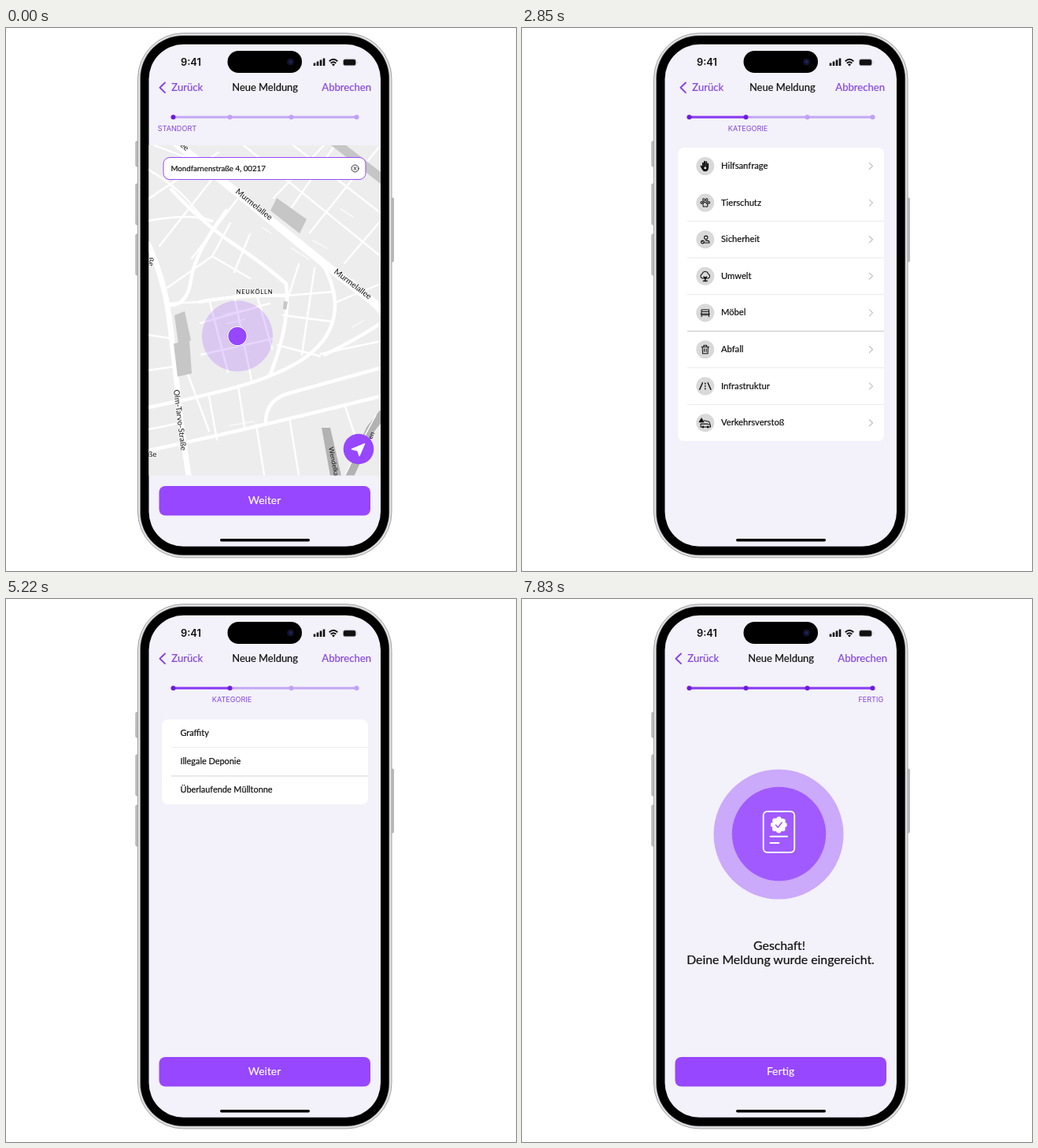
An HTML page that plays this animation: 648x690 px, repeating every 8 s.

```html
<!DOCTYPE html>
<html lang="de">
<head>
<meta charset="utf-8">
<style>
html, body { margin: 0; width: 100%; height: 100%; overflow: hidden; background: #fff; }
svg { display: block; width: 648px; height: 690px; }
text { font-family: Lato, "Open Sans", sans-serif; fill: #111; }
.medium { stroke: currentColor; stroke-width: .18; }
.inter { font-family: Inter, sans-serif; }
.street { font: 10px Roboto, sans-serif; fill: #444; stroke: #fff; stroke-width: 1.5; paint-order: stroke; }
.mid { text-anchor: middle; }
.line { fill: none; stroke-linecap: round; stroke-linejoin: round; }
.purple { fill: #8444e0; color: #8444e0; }
.white { fill: #fff; color: #fff; }
.solid { fill: #111; }
.page { display: none; }
.page.on { display: inline; }
</style>
</head>
<body>
<svg viewBox="0 0 648 690">
  <defs>
    <clipPath id="mapArea"><rect x="181.500" y="149" width="294.500" height="419.500"/></clipPath>
  </defs>

  <!-- phone body -->
  <g fill="#bdbdc0" stroke="#98989b" stroke-width=".6">
    <rect x="164.800" y="144" width="4" height="32" rx="1.200"/>
    <rect x="164.800" y="198" width="4" height="52" rx="1.200"/>
    <rect x="164.800" y="262" width="4" height="52" rx="1.200"/>
    <rect x="488.500" y="216" width="4" height="81" rx="1.200"/>
  </g>
  <rect x="167.500" y="6.500" width="322.500" height="666.500" rx="58" fill="#e2e2e4" stroke="#a2a2a5"/>
  <rect x="170.200" y="9.200" width="317" height="661" rx="55" fill="#77777a"/>
  <rect x="171" y="10" width="315.500" height="659.500" rx="54"/>
  <rect x="181.500" y="20.800" width="294.500" height="638" rx="44" fill="#f3f1f9"/>

  <!-- status bar -->
  <rect x="281.500" y="29" width="94.500" height="28" rx="14"/>
  <circle cx="361.500" cy="43" r="4.500" fill="#11122c"/><circle cx="361.500" cy="43" r="2" fill="#20235c"/>
  <text class="inter" x="222" y="47.700" font-size="12.800" font-weight="600">9:41</text>
  <path d="M392 44.500v3.500M396 42.500v5.500M400 40.500v7.500M404 38.500v9.500" stroke="#111" stroke-width="2.600"/>
  <path d="M410.700 42.300q5.300-5 10.600 0M412.700 44.800q3.300-3.100 6.600 0" fill="none" stroke="#111" stroke-width="1.900"/>
  <path d="M416 48.500l-2-2.200q2-1.600 4 0z"/>
  <rect x="428.500" y="39.700" width="16" height="8" rx="2.300" fill="#111" stroke="#aaa" stroke-width=".7"/>
  <path d="M446 42.200q1.500 1.500 0 3z" fill="#aaa"/>

  <!-- location -->
  <g class="page">
    <g clip-path="url(#mapArea)">
      <path fill="#ededed" d="M181 149h296v420h-296z"/>
      <g class="line" stroke="#fff">
        <path stroke-width="2.400" d="M181 217L270 158M195 277L265 188M236 293L302 207M181 245q55-10 82 0M228 164l-40-15M181 180q35 20 55 45t27 20
          M302 149L476 290M340 216L404 149M386 260L442 190L476 149M430 299L476 245M365 149L476 235M320 165L348 190M418 149L360 232
          M262 290l48 28M285 248l-23 42M310 262l-20 48M205 330l57-40M205 350l45-2M247 375l88-25M248 415l90-20M258 345l24 92M290 340l22 108M318 337l20 70
          M356 340l62-5M352 365l62 8M345 403l54 14M372 300l-12 38M392 305l-16 110M476 325l-58 24M476 398l-76 16M440 320l36 44
          M228 432l30 80M258 468l10 55M295 455l8 52M318 504l10 64M360 495l12 73M430 478l20 60M181 390l32 5M181 435l34-5M181 510l40-8"/>
        <path stroke-width="4.500" d="M210 205Q252 250 290 275T356 325Q362 375 335 442M181 482Q300 458 335 442Q420 410 418 349Q415 315 396 292
          M246 348Q300 338 356 340M181 537Q330 505 476 468M330 501Q330 472 360 464T476 432M405 415Q445 396 476 375M280 232Q240 285 235 320T205 352"/>
        <path stroke-width="7" d="M181 275Q201 320 207 365T222 500L232 569"/>
        <path stroke-width="10" d="M200 133L314 226L400 296L478 357"/>
        <path stroke-width="1.500" opacity=".7" d="M363 280l22 14M372 268l25 22M390 270l18 10M277 364l22-5M280 376l24-6M325 253l12 8M425 230l16 10M285 505l30-5M440 380l14-8"/>
      </g>
      <g fill="#c6c6c6">
        <path d="M344 216L382 243L373 261L336 232Z"/>
        <path d="M214 365L227 360L235 397L219 401Z"/>
        <path d="M213 401L233 397L236 439L218 443Z"/>
        <path d="M353 347l5 1-2 10-4-1z"/>
        <path d="M413 149L432 149L476 183V198Z"/>
        <path d="M401 508L412 508L426 569H412Z" fill="#b2b2b2"/>
      </g>
      <path class="line" d="M478 491L463 510L436 570" stroke="#b2b2b2" stroke-width="11"/>
      <path class="line" d="M470 492L452 525L430 570" stroke="#fff" stroke-width="1.500"/>
      <g class="street">
        <text transform="translate(217 147) rotate(39)">llee</text>
        <text transform="translate(291 209) rotate(39)" style="font-size:10.400px">Murmelallee</text>
        <text transform="translate(416 311) rotate(37)" style="font-size:10.400px">Murmelallee</text>
        <text transform="translate(213 460) rotate(83)">Olm-Tarvo-Straße</text>
        <g style="font-size:8.500px;stroke:none">
          <text transform="translate(410 533) rotate(79)">Wendelkai</text>
          <text transform="translate(465 523) rotate(-66)">en</text>
        </g>
        <text x="180.500" y="545">ße</text>
        <text transform="translate(180 292) rotate(83)">ße</text>
        <text class="mid" x="316" y="338" style="font-size:7.500px;letter-spacing:.9px;font-weight:500">NEUKÖLLN</text>
      </g>
    </g>
    <circle cx="294" cy="391.500" r="45" fill="#9747ff" opacity=".22"/>
    <circle cx="294" cy="391.500" r="13.300" fill="#0002"/>
    <circle cx="294" cy="391.500" r="12.200" fill="#9747ff" stroke="#fff" stroke-width="1.200"/>
    <rect x="200" y="164.500" width="257" height="28" rx="8" fill="#fff" stroke="#9747ff"/>
    <text class="medium" x="209.500" y="182" font-size="9.700">Mondfarnenstraße 4, 00217</text>
    <g class="line" stroke="#222" stroke-width=".9"><circle cx="443.500" cy="178.500" r="4.500"/><path d="M442 176.500l3 4m0-4l-3 4"/></g>
    <circle cx="448" cy="535" r="19.300" fill="#9747ff"/>
    <path d="M455.500 528.500L439.500 535.200L447 537L449 543.500Z" fill="#fff" stroke="#fff" stroke-width="1.500" stroke-linejoin="round"/>
  </g>

  <!-- category -->
  <g class="page">
    <rect x="198" y="152" width="262" height="373" rx="8" fill="#fff"/>
    <g id="rows"></g>
  </g>

  <!-- subcategory -->
  <g class="page">
    <rect x="198" y="153" width="262" height="108" rx="8" fill="#fff"/>
    <path d="M210 188.500h250" stroke="#ececf0"/><path d="M210 224.800h250" stroke="#dcdce0" stroke-width="1.300"/>
    <g class="medium" font-size="10.900">
      <text x="221.500" y="174">Graffity</text><text x="221.500" y="210">Illegale Deponie</text><text x="221.500" y="246">Überlaufende Mülltonne</text>
    </g>
  </g>

  <!-- description -->
  <g class="page">
    <rect x="194" y="153.500" width="268.500" height="192.500" rx="20" fill="#fff" stroke="#dddde3"/>
    <text class="inter" x="211" y="177" font-size="9.200" style="fill:#a5a5a8">Beschreibe dein Anliegen....</text>
    <g class="line" stroke="#b9b9be" stroke-width="1.200">
      <rect x="416.500" y="359.500" width="39" height="22" rx="8"/>
      <g stroke="#98989d"><rect x="433.500" y="363" width="5" height="9" rx="2.500"/><path d="M431 369v1q0 4.500 5 4.500t5-4.500v-1M436 374.500v3M432.500 377.500h7"/></g>
    </g>
    <path d="M194 404.500h270" stroke="#cacacf"/>
    <g class="medium" font-size="11"><text x="203.500" y="432">Wenn vorhanden, füge ein Photo zu deinem</text><text x="203.500" y="444">Anliegen hinzu</text></g>
    <g fill="#fff">
      <rect x="201" y="459" width="79" height="75" rx="6"/><rect x="289" y="459" width="79" height="75" rx="6"/><rect x="381" y="459" width="79" height="75" rx="6"/>
    </g>
    <g class="line" stroke="#8444e0" stroke-width="1.500">
      <path d="M232.500 476.500h3l2-2.500h7l2 2.500h3q1.500 0 1.500 1.500v11q0 1.500-1.500 1.500h-17q-1.500 0-1.500-1.500v-11q0-1.500 1.500-1.500z"/>
      <circle cx="241" cy="483" r="4.500"/><path d="M247.500 479.500h.1"/>
      <path d="M321 487h-1.500q-1.500 0-1.500-1.500v-10q0-1.500 1.500-1.500h14q1.500 0 1.500 1.500v2"/>
      <rect x="321.500" y="478" width="17" height="12.500" rx="1.500"/>
      <path d="M322 490l5-5 3 2.500 4-5 4.500 5.500v2.500z" fill="#8444e0"/><circle cx="327" cy="482" r=".6"/>
      <circle cx="420" cy="482.500" r="8.300"/><path d="M417.500 479l5 7m0-7l-5 7"/>
    </g>
    <g class="mid purple medium" font-size="11">
      <text class="purple" x="240.500" y="517.500">Kamera</text><text class="purple" x="328" y="517.500">Gallery</text><text class="purple" x="419.700" y="518">Kein Foto</text>
    </g>
  </g>

  <!-- done -->
  <g class="page">
    <circle cx="326" cy="299" r="82.500" fill="#cba9fb"/><circle cx="326.500" cy="298.500" r="59.700" fill="#a15aff"/>
    <g class="line" stroke="#fff" stroke-width="1.900">
      <rect x="306.700" y="270" width="39.500" height="52" rx="5"/><path d="M315.500 301.800h21.500M315.500 310h11"/>
      <circle cx="326.300" cy="287" r="7.200" fill="#fff" stroke-width="6.400" stroke-dasharray="0 5.655"/>
      <path d="M322.500 287.300l2.700 2.900 5-6.200" stroke="#a15aff" stroke-width="1.600"/>
    </g>
    <g class="mid medium" font-size="15.800"><text x="327" y="445.500">Geschaft!</text><text x="328.500" y="463.500">Deine Meldung wurde eingereicht.</text></g>
  </g>

  <!-- shared header, steps and footer -->
  <path class="line" id="chevron" stroke="#8444e0" stroke-width="1.900"/>
  <g class="medium" font-size="13.100">
    <text class="purple" id="back" y="80">Zurück</text>
    <text class="mid" id="title" y="80" font-size="12.900">Neue Meldung</text>
    <text class="purple" id="cancel" y="80" text-anchor="end">Abbrechen</text>
  </g>
  <g id="steps"></g>
  <text class="inter purple mid" id="label" font-size="9.100"></text>
  <g id="footer">
    <rect x="194.500" y="582" width="268.500" height="37.500" rx="8" fill="#9747ff"/>
    <text class="mid white medium" id="action" x="328.500" y="605.300" font-size="13.800"></text>
  </g>
  <rect x="272" y="649" width="114" height="3.400" rx="1.700"/>
</svg>
<script>
const $ = id => document.getElementById(id);

// icons are drawn around their own centre
const categories = [
  ['Hilfsanfrage', '<path stroke-width="2" d="M-3 1v-5M-.8 0v-6M1.500 0v-5.500M3.600 1v-4M-5.500 0l2 3.500"/><path class="solid" d="M-4 1h8q0 5.500-4 5.500t-4-5.500z"/><circle cy="2.500" r="1" stroke="#fff" fill="#fff"/>'],
  ['Tierschutz', '<path d="M0-.5q2 0 3 3t-1.500 2.800q-1.500-.6-3 0T-3 2.500t3-3z"/><ellipse cx="-2" cy="-3.700" rx="1.300" ry="1.900"/><ellipse cx="2" cy="-3.700" rx="1.300" ry="1.900"/><circle cx="-4.700" cy="-.3" r="1.400"/><circle cx="4.700" cy="-.3" r="1.400"/>'],
  ['Sicherheit', '<circle cx="1" cy="-2.500" r="2.300"/><path d="M-1 4.500h6.500q0-3-3-3h-2"/><circle class="solid" cx="-3.500" cy="3.500" r="2"/><path stroke="#ddd" d="M-4.500 3.500l.8.800 1.200-1.500"/>'],
  ['Umwelt', '<path d="M-3 3q-3.500-.5-3-3.500.2-2 2-2.500 1-3 4-3t4 3q1.800.5 2 2.500.5 3-3 3.500z"/><path stroke-width="1.600" d="M0 6.500v-5M-2 1l2 2 2-2M-2.500 6.500h5"/>'],
  ['Möbel', '<path d="M-5-4h10M-5-1.500h10M-6 1.500h12M-5-4v9M5-4v9M-5 3h10"/>'],
  ['Abfall', '<path d="M-5-3.500h10M-2-3.500v-2h4v2M-3.800-3.500l.4 9h6.800l.4-9M-1.300-1v4M1.300-1v4"/>'],
  ['Infrastruktur', '<path stroke-width="1.500" d="M-3.500-4.500l-4 9M3.500-4.500l4 9M0-4v1M0-.5v1M0 3v1"/>'],
  ['Verkehrsverstoß', '<path class="solid" d="M-5-6l3 5h-6z"/><path d="M-6 1.500h9l4 1.500v2.500h-13zM-1.500-3l6.500 1.500 1.500 3"/><circle class="solid" cx="-3" cy="5.500" r="1"/><circle class="solid" cx="3.500" cy="5.500" r="1"/>']
];

$('rows').innerHTML = categories.map(([name, icon], i) => {
  const y = 175.5 + i * 46.6;
  const divider = i > 1 ? `<path d="M210 ${y - 23.3}h250" stroke="${i == 5 ? '#d6d6db' : '#e9e9ed'}" stroke-width="${i == 5 ? 1.4 : 1}"/>` : '';
  return `${divider}<circle cx="232.800" cy="${y}" r="11.500" fill="#d9d9d9"/>
    <g class="line" transform="translate(232.800 ${y}) scale(.95)" stroke="#111" stroke-width="1.100">${icon}</g>
    <text class="medium" x="253" y="${y + 3.4}" font-size="11.200">${name}</text>
    <path class="line" d="M441.300 ${y - 4}l4.200 4-4.200 4" stroke="#c3c3c8" stroke-width="1.200"/>`;
}).join('');

const stops = [212.5, 284.5, 362.5, 445.5];
const labels = [['STANDORT', 217.5, 130.5], ['KATEGORIE', 287, 130.5], ['BESCHREIBUNG', 365.3, 131.3], ['FERTIG', 443.3, 131.3]];
const pages = [
  { start: 0, step: 0, action: 'Weiter' },
  { start: 2850, step: 1, inset: 6 },
  { start: 4530, step: 1, action: 'Weiter', low: 0.8 },
  { start: 5550, step: 2, action: 'Weiter' },
  { start: 6690, step: 3, action: 'Fertig' }
];
const groups = document.querySelectorAll('.page');
let shown = -1;

function show(index) {
  const { step, action, inset = 0, low = 0 } = pages[index];
  groups.forEach((g, i) => g.classList.toggle('on', i == index));
  $('chevron').setAttribute('d', `M${202 + inset} 69.500l-6.500 6.300 6.500 6.300`);
  $('back').setAttribute('x', 210.3 + inset);
  $('title').setAttribute('x', inset ? 330.8 : 329.2);
  $('cancel').setAttribute('x', 464 - inset / 2);

  $('steps').innerHTML = `<path d="M212.500 113.300H445.500" stroke="#c5a8f7" stroke-width="3"/>
    <path d="M212.500 113.300H${stops[step]}" stroke="#8a3ff0" stroke-width="3"/>` +
    stops.map((x, i) => `<circle cx="${x}" cy="113.300" r="3" fill="${i <= step ? '#6d1be0' : '#c0a0f5'}"/>`).join('');

  const [name, x, y] = labels[step];
  $('label').textContent = name;
  $('label').setAttribute('x', x);
  $('label').setAttribute('y', y + low);
  $('footer').style.display = action ? '' : 'none';
  $('action').textContent = action || '';
  shown = index;
}

function tick() {
  const t = performance.now() % 8000;
  const index = pages.findLastIndex(p => t >= p.start);
  if (index != shown) show(index);
  requestAnimationFrame(tick);
}
tick();
</script>
</body>
</html>
```
